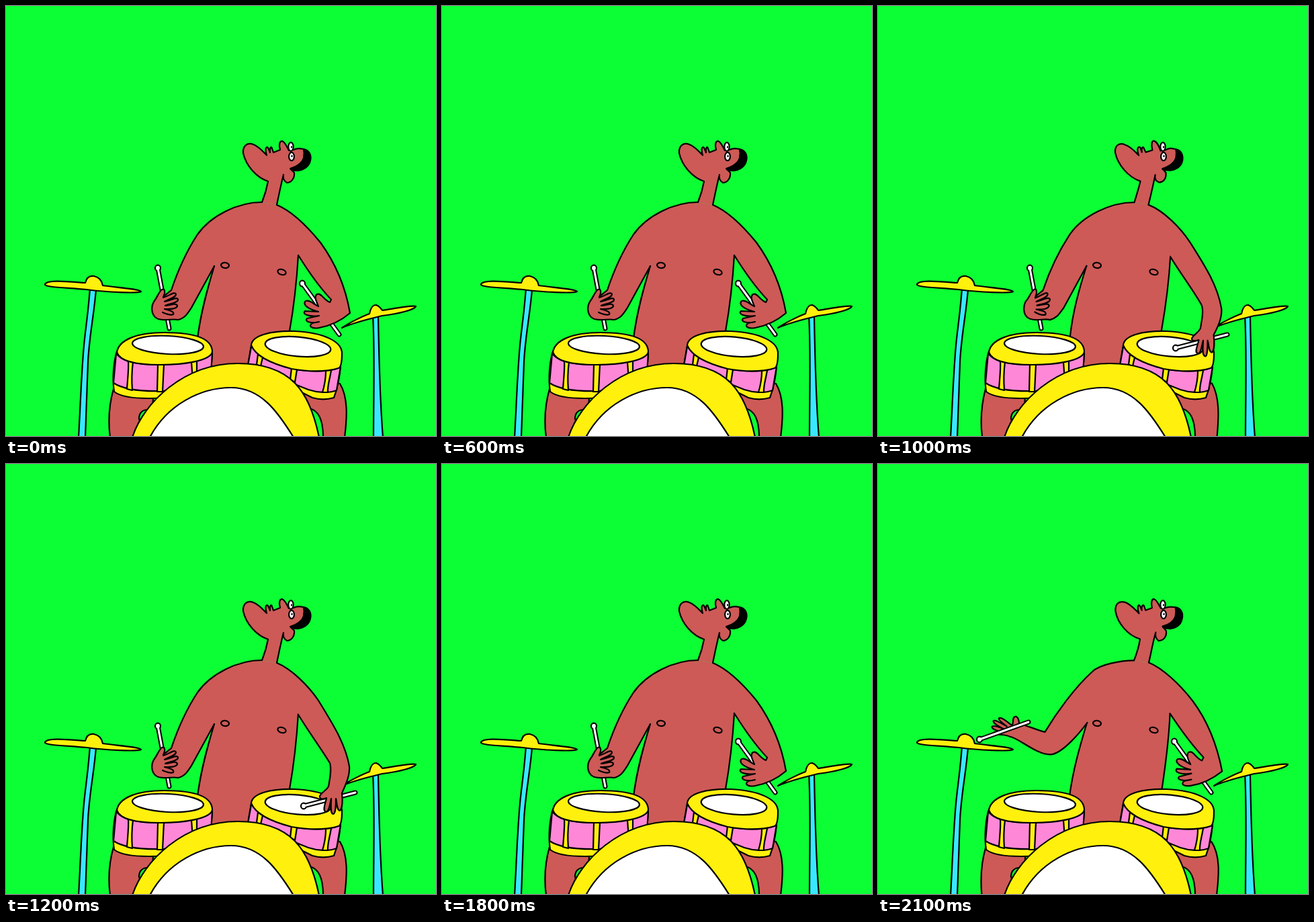
An HTML page with a canvas that plays this animation: 640 by 640 pixels, repeating every 2.2 s.

```html
<!DOCTYPE html>
<html lang="en">
<head>
<meta charset="utf-8">
<title>Drummer</title>
<style>
html, body { margin: 0; width: 100%; height: 100%; overflow: hidden; background: #0cff34; }
canvas { display: block; width: 640px; height: 640px; }
</style>
</head>
<body>
<canvas id="stage" width="640" height="640"></canvas>
<script>
const ctx = document.getElementById('stage').getContext('2d');
const GREEN = '#0cff34', SKIN = '#cd5a57', YELLOW = '#fff00d', PINK = '#ff87d7',
      BLUE = '#38e8ff', WHITE = '#fff', BLACK = '#000';
const STEP = 100, STEPS = 22;

// Steps on which each hand strikes; otherwise it rests
const LEFT_DRUM = [2, 4, 15], RIGHT_DRUM = [8, 10, 12], CYMBAL = [20, 21];

const LEFT = {
  rest: {
    stick: [226, 390, 243, 480],
    arm: 'M381 292C345 292 305 312 285 340C268 366 255 396 246 423C241 427 237 430 234 433C238 425 236 420 232 422C227 426 225 434 220 440C214 451 218 463 227 466C237 469 248 465 256 467C266 465 270 458 276 449L310 387',
    lines: 'M234 434C244 431 251 424 253 429C253 434 242 436 236 440C246 438 255 432 256 437C256 442 243 443 237 446C246 445 255 441 255 447C252 452 242 451 236 451C244 453 251 455 249 459C244 461 238 458 233 456'
  },
  drum: {
    stick: [277, 505, 221, 470],
    arm: 'M381 292C345 292 300 315 272 350C248 382 234 410 242 473C236 485 230 494 234 497C238 497 240 492 243 488C240 497 236 505 242 506C247 504 247 494 249 489C247 500 246 509 251 508C256 506 254 496 255 489C256 498 255 509 260 508C264 504 260 494 261 485C264 491 268 490 269 486C268 480 264 478 263 473C263 455 262 430 272 417C282 405 295 398 308 390'
  },
  cymbal: {
    stick: [151, 410, 224, 384],
    front: true,
    arm: 'M381 292C362 292 330 298 318 309C292 333 265 370 248 399C235 395 224 390 210 386C210 378 206 374 202 377C200 381 202 385 200 389C192 384 184 376 180 378C178 381 188 387 192 391C184 386 174 379 172 383C172 387 182 391 188 395C180 391 170 388 169 392C171 396 180 397 186 400C178 399 172 398 172 401C178 404 188 402 195 405C210 408 235 432 257 432C275 430 300 400 312 385'
  }
};
const RIGHT = {
  rest: {
    stick: [441, 413, 496, 489],
    arm: 'M403 296C425 305 450 330 468 352C492 385 506 422 512 457C498 469 482 476 466 479C455 481 449 476 456 472L466 470C454 473 444 470 448 465L466 461C452 463 440 459 445 454L465 455C452 452 440 445 446 439C452 437 458 444 465 447C462 440 458 432 463 429C469 426 473 438 482 441L484 437C466 418 450 395 435 371'
  },
  drum: {
    stick: [443, 509, 520, 489],
    arm: 'M403 296C425 305 450 330 465 352C485 385 505 415 511 450C512 465 505 478 500 490C501 500 501 512 497 516C492 515 493 505 491 498C491 508 491 520 487 521C482 520 484 508 484 498C482 508 480 520 475 517C471 514 476 504 477 497C474 499 466 500 467 494C471 487 476 487 480 480C482 468 485 455 482 445C468 422 450 398 435 373'
  }
};

let seed = 0;

// Redraws the figure's line a little differently on each step
const wobble = d => seed
  ? d.replace(/\d+/g, v => (+v + .5 * Math.sin(v * 7 + seed * 3)).toFixed(2))
  : d;

function draw(d, fill, line = 2.2) {
  const path = new Path2D(d);
  if (fill) { ctx.fillStyle = fill; ctx.fill(path); }
  if (line) { ctx.strokeStyle = BLACK; ctx.lineWidth = line; ctx.stroke(path); }
}

const skin = (d, line) => draw(wobble(d), SKIN, line);

function oval(x, y, rx, ry, tilt, fill, line = 2.2) {
  ctx.beginPath();
  ctx.ellipse(x, y, rx, ry, tilt, 0, 7);
  ctx.fillStyle = fill;
  ctx.fill();
  if (line) { ctx.strokeStyle = BLACK; ctx.lineWidth = line; ctx.stroke(); }
}

function stick([x1, y1, x2, y2]) {
  const line = (color, width) => {
    ctx.strokeStyle = color;
    ctx.lineWidth = width;
    ctx.beginPath();
    ctx.moveTo(x1, y1);
    ctx.lineTo(x2, y2);
    ctx.stroke();
  };
  line(BLACK, 7);
  oval(x1, y1, 4, 4.4, 0, WHITE);
  line(WHITE, 3);
}

function arm(pose) {
  if (!pose.front) stick(pose.stick);
  skin(pose.arm);
  if (pose.lines) skin(pose.lines);
  if (pose.front) stick(pose.stick);
}

// Covers the joins between the arms and the chest
const chest = () => skin('M381 295L345 312L320 345L313 387L370 400L432 373L436 350L425 316L403 299Z', 0);

function stands(tilt) {
  draw('M125 420L134 422C131 460 124 490 122 530L118 642L108 642C111 590 112 550 116 505C119 475 122 460 125 420Z', BLUE);
  draw('M546 460L554 460C555 520 556 580 561 642L547 642C547 580 549 510 546 460Z', BLUE);
  ctx.save();
  ctx.translate(130, 416);
  ctx.rotate(tilt);
  ctx.translate(-130, -416);
  draw('M58 414C62 407 90 410 118 412C120 404 125 401 131 402C140 404 143 410 144 416C165 419 198 421 201 425C195 428 150 426 120 422C90 419 57 419 58 414Z', YELLOW);
  ctx.restore();
  draw('M500 479C510 472 530 462 541 458C543 448 546 445 551 445C556 447 558 450 560 453C580 450 605 445 610 447C608 452 585 458 560 461C540 466 520 470 500 479Z', YELLOW);
}

function body() {
  skin('M160 570C153 595 152 620 155 642L215 642L220 570Z');
  draw('M210 601C203 601 198 606 198 614L200 622Z', GREEN);
  skin('M440 560L497 562C509 582 508 610 504 642L440 642Z');
  draw('M452 599C465 602 472 615 472 642L440 642Z', GREEN);
  skin('M381 292L310 387C300 420 290 455 285 495L300 560L420 560L422 484C428 450 433 405 435 371L403 296Z', 0);
  draw(wobble('M310 387C300 420 290 455 285 495M422 484C428 450 433 405 435 371'));
}

function drums() {
  draw('M165 514C160 530 158 555 161 574C175 585 210 585 240 583L300 560L305 545L307 517Z', YELLOW);
  draw('M164 517C175 532 205 534 235 534C265 532 295 528 307 517L305 546L290 560L235 573C205 574 175 571 160 561Z', PINK);
  draw('M182 528L189 530C187 545 187 560 188 572L180 570C181 555 183 540 182 528Z', YELLOW);
  draw('M226 533L235 533L233 574L225 574Z', YELLOW);
  draw('M276 530L284 528L284 556L278 558Z', YELLOW);
  draw('M165 515C168 498 192 486 236 486C278 486 307 494 307 515C304 528 265 534 230 534C200 534 170 531 165 515Z', YELLOW);
  oval(241, 504.5, 53, 13.5, .05, WHITE);

  draw('M365 505L360 535L456 583C466 586 478 586 488 583C493 570 497 550 498 535Z', YELLOW);
  draw('M365 507L360 535L450 571C462 575 480 577 492 572L498 537C485 545 450 545 425 540Z', PINK);
  draw('M375 518L382 523L379 536L373 534Z', YELLOW);
  draw('M425 539L433 541L430 560L423 556Z', YELLOW);
  draw('M476 543L484 542C482 555 478 567 479 575L471 575C474 565 476 555 476 543Z', YELLOW);
  draw('M365 505C366 490 395 483 430 484C472 486 501 499 500 518C500 527 499 537 495 539C475 545 448 544 425 540C398 533 372 522 365 505Z', YELLOW);
  oval(434.5, 507, 49, 14.5, .09, WHITE);

  draw('M188 642C205 590 265 532 345 532C425 532 452 574 466 642Z', YELLOW);
  draw('M214 642C240 593 290 568 335 568C380 568 405 605 428 642Z', WHITE);
}

function head() {
  skin('M381 292C385 282 388 272 390 261C372 255 357 237 353 219C352 207 360 203 368 206C376 209 382 216 388 222C385 213 387 208 390 211L393 218C392 211 395 208 396 212L398 218L408 214C406 206 407 201 411 201C416 203 418 210 421 215L428 214C433 211 438 212 443 213C447 221 446 236 424 243L429 248C430 257 424 263 418 263C413 260 412 256 413 251C409 267 406 282 403 296');
  draw(wobble('M443 213C451 214 455 222 453 230C451 240 440 246 432 245C428 245 424 245 423 242C432 239 441 234 443 226C444 221 444 217 443 213Z'), BLACK);
  oval(424, 209.5, 3.7, 6.3, 0, WHITE);
  oval(425, 224, 3.9, 6.2, 0, WHITE);
  oval(425, 210, 1.2, 1.4, 0, BLACK, 0);
  oval(425.5, 223.5, 1.2, 1.4, 0, BLACK, 0);
  oval(326, 386, 6, 4, .1, SKIN);
  oval(410.5, 396, 6.3, 4, .3, SKIN);
}

function render(step) {
  seed = step % 6 ? step : 0;
  const left = CYMBAL.includes(step) ? 'cymbal' : LEFT_DRUM.includes(step) ? 'drum' : 'rest';
  const right = RIGHT_DRUM.includes(step) ? 'drum' : 'rest';
  ctx.fillStyle = GREEN;
  ctx.fillRect(0, 0, 640, 640);
  stands(step === CYMBAL[0] ? -.04 : 0);
  body();
  drums();
  arm(LEFT[left]);
  arm(RIGHT[right]);
  chest();
  head();
}

function tick() {
  render(Math.floor(performance.now() / STEP) % STEPS);
  requestAnimationFrame(tick);
}

ctx.lineJoin = ctx.lineCap = 'round';
tick();
</script>
</body>
</html>
```
